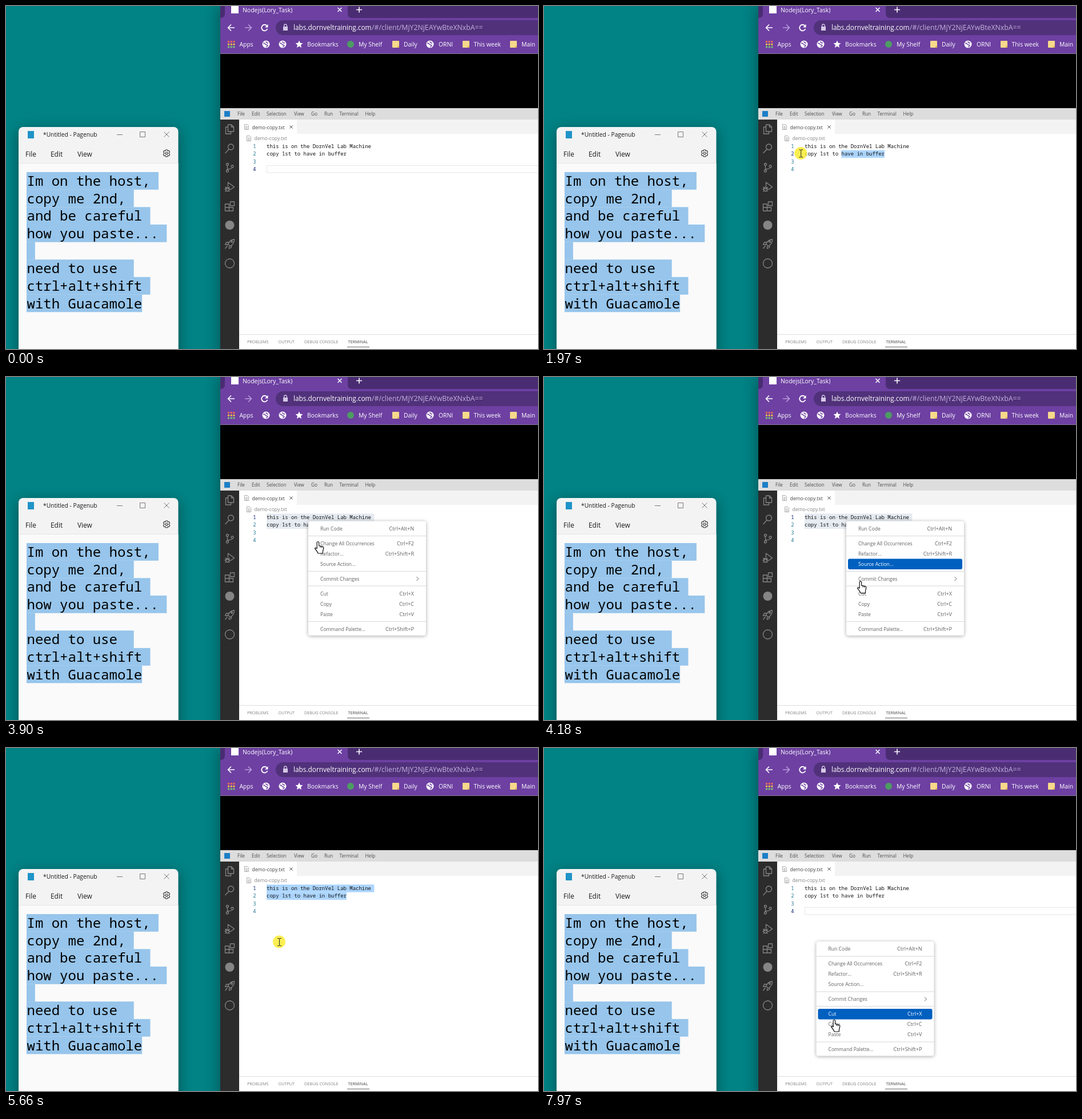
An HTML page with a canvas for the animation above (8000 ms loop, 931 by 601 pixels).

```html
<!DOCTYPE html>
<html lang="en">
<head>
<meta charset="utf-8">
<title>Copy and paste demo</title>
<style>
html, body { margin: 0; width: 100%; height: 100%; overflow: hidden; background: #018284; }
canvas { display: block; }
</style>
</head>
<body>
<canvas id="stage" width="931" height="601"></canvas>
<script>
(() => {
const c = document.getElementById('stage').getContext('2d');
const LOOP = 8000, LAG = 150;
const UI = '"Open Sans", "Noto Sans", sans-serif';
const MONO = '"Noto Sans Mono", "DejaVu Sans Mono", monospace';

// ---- drawing helpers ----
function rect(x, y, w, h, color) {
  c.fillStyle = color;
  c.fillRect(x, y, w, h);
}
function round(x, y, w, h, r, color) {
  c.fillStyle = color;
  c.beginPath();
  c.roundRect(x, y, w, h, r);
  c.fill();
}
function disc(x, y, r, color) {
  c.fillStyle = color;
  c.beginPath();
  c.arc(x, y, r, 0, 7);
  c.fill();
}
function text(s, x, y, size, color, align = 'left', font = UI) {
  c.font = size + 'px ' + font;
  c.fillStyle = color;
  c.textAlign = align;
  c.fillText(s, x, y);
}
function icon(x, y, d, stroke, width = 1.3, fill) {
  const p = new Path2D(d);
  c.save();
  c.translate(x, y);
  if (fill) { c.fillStyle = fill; c.fill(p); }
  if (stroke) {
    c.strokeStyle = stroke;
    c.lineWidth = width;
    c.lineJoin = 'round';
    c.stroke(p);
  }
  c.restore();
}
function shadow(color, blur, dy, draw) {
  c.save();
  c.shadowColor = color;
  c.shadowBlur = blur;
  c.shadowOffsetY = dy;
  draw();
  c.restore();
}

// ---- left window ----
const note = ['Im on the host, ', 'copy me 2nd, ', 'and be careful ', 'how you paste... ', ' ',
  'need to use  ', 'ctrl+alt+shift ', 'with Guacamole'];

function notes() {
  shadow('rgba(0,0,0,.4)', 22, 6, () => round(22, 212, 279.5, 420, 8, '#f3f3f3'));
  rect(22, 276, 279.5, 325, '#fafafa');
  rect(22, 275, 279.5, 1, '#e6e6e6');
  rect(38, 219, 11, 13, '#1f94c8');
  text('*Untitled - Pagenub', 65, 229, 10.25, '#1a1a1a');
  icon(199, 225, 'M-5 .5H5', '#777', 1);
  icon(239, 225, 'M-4.5-4.5h9v9h-9z', '#777', 1);
  icon(281, 225, 'M-4.5-4.5l9 9M4.5-4.5l-9 9', '#777', 1);
  text('File', 34, 263.5, 11.9, '#1a1a1a');
  text('Edit', 78, 263.5, 11.9, '#1a1a1a');
  text('View', 125, 263.5, 11.9, '#1a1a1a');
  icon(281, 258, 'M-1.5-6h3l.6 2 2-.8 1.6 2.5-1.4 1.6v1.4l1.4 1.6-1.6 2.5-2-.8-.6 2h-3l-.6-2-2 .8-1.6-2.5 1.4-1.6v-1.4l-1.4-1.6 1.6-2.5 2 .8zM2 0a2 2 0 1 0-4 0a2 2 0 1 0 4 0', '#333', 1.1);
  note.forEach((s, i) => {
    const y = 291 + i * 30.65;
    rect(36, y, s.length * 14.4 + .5, 30.8, '#97c5eb');
    text(s, 36.5, y + 24, 24, '#000', 'left', MONO);
  });
}

// ---- browser frame ----
function globe(x) {
  disc(x, 67, 6.5, '#fff');
  icon(x, 67, 'M-5-2q3 0 4 2t3 1l1 2-3 2M0-5q0 3 4 3', '#6d40a2', 1.5);
}
function folder(x) {
  round(x, 61, 12, 12, 1, '#f7d98b');
  rect(x + 9, 70, 3, 3, '#e0b654');
}
function browser() {
  shadow('rgba(0,0,0,.4)', 24, 0, () => rect(375, 0, 570, 620, '#6d40a2'));
  rect(375, 0, 556, 21, '#4a2c73');
  icon(0, 0, 'M375 21q8 0 8-8V0h215v13q0 8 8 8z', null, 1, '#6d40a2');
  rect(394, 0, 13, 13, '#fff');
  text('Nodejs(Lory_Task)', 414, 10.5, 10.45, '#fff');
  icon(584, 6.5, 'M-3.5-3.5l7 7M3.5-3.5l-7 7', '#fff', 1.5);
  icon(618, 6.5, 'M-5 0H5M0-5V5', '#fff', 1.6);

  icon(394, 38, 'M6 0H-5M0-5.5L-5.5 0 0 5.5', '#fff', 1.7);
  icon(424, 38, 'M-6 0H5M0-5.5L5.5 0 0 5.5', '#b99bdc', 1.7);
  icon(452.5, 38, 'M4-3.5A5.3 5.3 0 1 0 5 2', '#fff', 1.8);
  icon(452.5, 38, 'M6-6v5.5H.5z', null, 1, '#fff');
  round(472, 25, 490, 26, 13, '#50317a');
  rect(485, 36, 8, 7, '#d5c8e6');
  icon(489, 36, 'M-2.4 0v-1.6a2.4 2.4 0 0 1 4.8 0V0', '#d5c8e6', 1.3);
  text('labs.dornveltraining.com', 503, 42, 11.8, '#fff');
  text('/#/client/MjY2NjEAYwBteXNxbA==', 640, 42, 12.3, '#c5b2dc');

  ['#ea6a5e', '#f2bd42', '#7cc576'].forEach((color, row) => {
    for (let i = 0; i < 3; i++) rect(388 + i * 4.7, 61 + row * 4.7, 3, 3, color);
  });
  globe(455);
  globe(484);
  icon(513, 67, 'M0-6.5l1.9 4.3 4.6.4-3.5 3.1 1 4.7L0 3.5-4 6l1-4.7-3.5-3.1 4.6-.4z', null, 1, '#fff');
  disc(603, 67, 6, '#4d9c62');
  folder(676);
  globe(742);
  folder(799);
  folder(882);
  const marks = [['Apps', 408.5], ['Bookmarks', 527], ['My Shelf', 617], ['Daily', 696], ['ORNI', 757],
    ['This week', 818.5], ['Main', 902]];
  for (const [s, x] of marks) text(s, x, 70.7, 10.35, '#fff');
  rect(375, 83, 556, 1, '#8a7a9c');
  rect(375, 84, 556, 95, '#000');
}

// ---- code editor ----
const sideIcons = [
  [216, 'M-3-8h6l4 4v8h-10zM3-8v4h4M-3-4h-4V8h9V4'],
  [250, 'M7-3a5 5 0 1 0-10 0a5 5 0 1 0 10 0M-1.5 1L-8 8'],
  [283, 'M-2-5.5a2 2 0 1 0-4 0a2 2 0 1 0 4 0M-2 6a2 2 0 1 0-4 0a2 2 0 1 0 4 0M6.5-2a2 2 0 1 0-4 0a2 2 0 1 0 4 0M-4-3.5V4M4.5 0Q4 3-4 2.5'],
  [317, 'M-3-1v-7L8 0 1 5M-1 4a3 3.5 0 1 0-6 0a3 3.5 0 1 0 6 0M-7 3h6M-8 0l2 2M0 0l-2 2M-9 4h2M-1 4h2M-8 8l2-2M0 8l-2-2'],
  [351, 'M-8-4h7v12h-7zM-8 2H6v6h-9M-1 2v6M1-8h7v7H1z'],
  [417, 'M8-8Q1-8-3 0L1 4Q8 0 8-8zM-2-3h-4l-2 4h5M3 2v4l-4 2V4M-4 3l-4 5M5-4a1.3 1.3 0 1 0-2.6 0a1.3 1.3 0 1 0 2.6 0'],
  [451, 'M8 0a8 8 0 1 0-16 0a8 8 0 1 0 16 0']
];
const code = ['this is on the DornVel Lab Machine', 'copy 1st to have in buffer'];
const CW = 5.382, LX = 456;
const lineY = i => 239.3 + i * 13.3;

function page(x, y) {
  icon(x, y, 'M-3.5-4.5h5l2 2v7h-7zM-2-1h4M-2 1h4M-2 3h4', '#999', .8);
}
function editor() {
  rect(375, 179, 556, 20, '#dddddd');
  rect(382, 184, 10, 10, '#1c7fc7');
  const menus = [['File', 405], ['Edit', 430], ['Selection', 456], ['View', 504], ['Go', 534], ['Run', 557],
    ['Terminal', 583.5], ['Help', 628.5]];
  for (const [s, x] of menus) text(s, x, 192.3, 8.2, '#4c4c4c');
  rect(375, 199, 33, 402, '#2c2c2c');
  for (const [y, d] of sideIcons) icon(391.5, y, d, '#858585');
  disc(391.5, 384, 8, '#858585');
  rect(408, 199, 523, 402, '#fff');
  rect(408, 199, 523, 25, '#f3f3f3');
  rect(408, 199, 101, 25, '#fff');
  page(421, 212);
  text('demo-copy.txt', 430.5, 215.5, 8.6, '#444');
  icon(499, 212, 'M-2.7-2.7l5.4 5.4M2.7-2.7l-5.4 5.4', '#555', 1);
  page(425, 232);
  text('demo-copy.txt', 434.5, 235.3, 8.6, '#858585');
  rect(408, 575, 523, 1, '#dedede');
  const tabs = [['PROBLEMS', 422], ['OUTPUT', 476.5], ['DEBUG CONSOLE', 522], ['TERMINAL', 598.5]];
  tabs.forEach(([s, x], i) => text(s, x, 591.2, 7.25, i == 3 ? '#424242' : '#808080'));
  rect(597, 597, 39, 1, '#666');
}

function codeLines(t) {
  const active = t < 1400 || t >= 5790 ? 3 : t < 2177 ? 1 : 0;
  const dragging = t >= 1560 && t < 2177;
  const selected = t >= 1560 && t < 5790;
  const selColor = t >= 3430 && t < 5060 ? '#e5ebf1' : '#add6ff';
  const start = [0, 0];

  if (dragging) {
    const col = Math.round((mouse(t - LAG)[0] - LX) / CW);
    start[0] = code[0].length + 1;
    start[1] = Math.min(code[1].length, Math.max(0, col));
  }
  if (selected) {
    code.forEach((s, i) => {
      const end = s.length + (i ? 0 : 1);
      rect(LX + start[i] * CW, lineY(i), (end - start[i]) * CW, 13.4, selColor);
    });
  } else {
    c.strokeStyle = '#e6e6e6';
    c.lineWidth = 1;
    c.strokeRect(LX + .5, Math.round(lineY(active)) + .5, 600, 12.5);
  }
  for (let i = 0; i < 4; i++)
    text(i + 1, 437.5, lineY(i) + 9.8, 8.9, i == active ? '#0b216f' : '#237893', 'right', MONO);
  code.forEach((s, i) => {
    text(s, LX, lineY(i) + 9.8, 8.97, '#111', 'left', MONO);
    if (!selected) return;
    [...s].forEach((ch, k) => {
      if (ch == ' ' && k >= start[i]) rect(LX + (k + .4) * CW, lineY(i) + 6.3, 1, 1, '#8397a8');
    });
  });
  if (t >= 210 && t < 730 || t >= 5790 && t < 6340) rect(LX, 279, 1, 14, '#000');
  if (t >= 1400 && t < 1560) rect(LX + 26 * CW - .4, 253, 1.2, 13, '#000');
}

// ---- context menu ----
const items = [['Run Code', 'Ctrl+Alt+N', 13], ['Change All Occurrences', 'Ctrl+F2', 39],
  ['Refactor...', 'Ctrl+Shift+R', 57], ['Source Action...', '', 75], ['Commit Changes', '>', 101],
  ['Cut', 'Ctrl+X', 127], ['Copy', 'Ctrl+C', 145], ['Paste', 'Ctrl+V', 163],
  ['Command Palette...', 'Ctrl+Shift+P', 189]];

function menuAt(t) {
  if (t >= 3430 && t < 5060) return [529, 252.5];
  if (t >= 6860) return [476.5, 339];
}
function contextMenu([x, y], t) {
  const hover = mouse(t - LAG)[1] - y;
  shadow('rgba(0,0,0,.35)', 6, 1, () => round(x, y, 206, 200.5, 4, '#fff'));
  for (const d of [25.5, 87.5, 113, 175.5]) rect(x, y + d, 206, 1, '#d8d8d8');
  for (const [label, key, d] of items) {
    const on = Math.abs(hover - d) < 9;
    const color = on ? '#fff' : '#616161';
    if (on) round(x + 3, y + d - 9, 200, 18.5, 3, '#0060c0');
    text(label, x + 21, y + d + 3.3, 8.6, color);
    if (key == '>') icon(x + 191, y + d, 'M-1.5-3.5L2 0l-3.5 3.5', color, 1);
    else text(key, x + 185, y + d + 3.3, 9.1, color, 'right');
  }
}

// ---- mouse ----
const track = [[130, 905, 601], [210, 856, 592], [530, 612, 331], [650, 612, 331], [1150, 618, 265],
  [1560, 618, 265], [1800, 530, 263], [2000, 435, 257], [2060, 409, 246], [2110, 420, 236],
  [2440, 420, 236], [2600, 475, 264], [2720, 532, 252], [3740, 532, 252], [3900, 546, 288],
  [4250, 556, 375], [4430, 558, 389], [5080, 558, 389], [5640, 478, 339.5],
  [7350, 478, 339.5], [7800, 505, 464], [7970, 508, 476]];

function mouse(t) {
  const i = track.findIndex(k => k[0] > t);
  if (i < 0) return track[track.length - 1].slice(1);
  if (!i) return track[0].slice(1);
  const [t0, x0, y0] = track[i - 1], [t1, x1, y1] = track[i];
  const f = (t - t0) / (t1 - t0);
  return [x0 + (x1 - x0) * f, y0 + (y1 - y0) * f];
}

const presses = [[1350, 2470], [3180, 3350], [4930, 5060], [5640, 5790], [6680, 6810]];
const BEAM = 'M-3.5-6.5h2.5q1 0 1 1 0-1 1-1h2.5M0-5.5v11M-3.5 6.5h2.5q1 0 1-1 0 1 1 1h2.5';
const ARROW = 'M0 0v14.5l3.4-3.2 2.3 5.2 2.2-1-2.3-5h4.6z';
const HAND = 'M-1.8 1.5q1.8-2.5 3.4 0v6l7 1.8q1.4.5 1.2 2.2l-1.4 6.5v3H0q-1-3-5.5-8.5 0-2.4 3.7 0z';

function cursor(t, menu) {
  if (t < 210) return;
  const [x, y] = mouse(t);
  if (presses.some(([a, b]) => t >= a && t < b)) disc(x, y, 11, 'rgba(250,235,40,.8)');
  if (menu && y - menu[1] > 8) {
    icon(x, y, HAND, '#111', 1.2, '#fff');
    icon(x, y, 'M4 8v3M6.7 9v2.5', '#111', 1);
  } else if (menu || x < 440) icon(x, y, ARROW, '#111', 1, '#fff');
  else icon(x + .5, y + .5, BEAM, '#222', 1);
}

function draw(t) {
  rect(0, 0, 931, 601, '#018284');
  notes();
  browser();
  editor();
  codeLines(t);
  const menu = menuAt(t);
  if (menu) contextMenu(menu, t);
  cursor(t, menu);
}

let began;
function tick(now) {
  began ??= now;
  draw((now - began) % LOOP);
  requestAnimationFrame(tick);
}
draw(0);
requestAnimationFrame(tick);
})();
</script>
</body>
</html>
```
